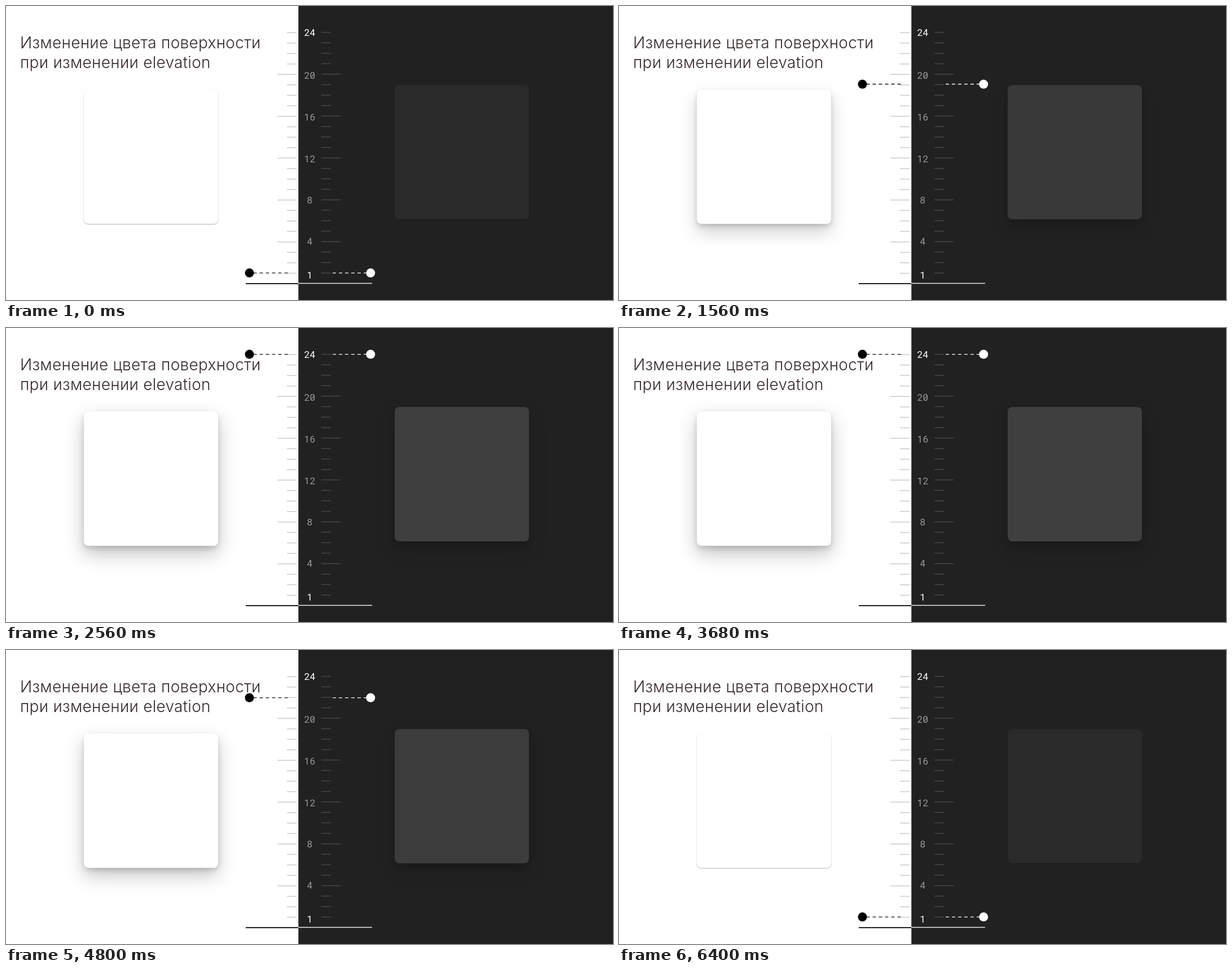
Animation of 1076 by 521 pixels, one loop 7.52 s. Source, as an HTML page:

```html
<!DOCTYPE html>
<html lang="ru">
<head>
<meta charset="utf-8">
<title>Elevation</title>
<style>
  html, body { margin: 0; width: 100%; height: 100%; overflow: hidden; background: #fff; }
  #stage { position: absolute; left: 0; top: 0; width: 1076px; height: 521px; overflow: hidden; }
  .card { position: absolute; width: 238px; height: 238px; border-radius: 8px; }
  #light { left: 138px; top: 148px; background: #fff; }
  #dark { left: 689px; top: 140px; }
  svg { position: absolute; left: 0; top: 0; }
  .title { font: 300 28px Inter, sans-serif; letter-spacing: .27px; fill: #352a2a; }
  .num { font: 17px Roboto, sans-serif; letter-spacing: .6px; text-anchor: middle; }
</style>
</head>
<body>
<div id="stage">
  <svg width="1076" height="521"><path d="M518.3 0H1076V521H518.3Z" fill="#212121"/></svg>
  <div class="card" id="light"></div>
  <div class="card" id="dark"></div>
  <svg width="1076" height="521" viewBox="0 0 1076 521">
    <g id="scale"></g>
    <path d="M541.6 126.2L545.7 119.8" stroke="#989898" stroke-width="1.2"/>
    <path d="M425 492H518" stroke="#231f20" stroke-width="1.8"/>
    <path d="M518 491.5H649" stroke="#e8e8e8" stroke-width="1.6"/>
    <g id="marker" stroke-width="1.4" stroke-dasharray="6 5">
      <path d="M499.5 0H438" stroke="#111"/>
      <path d="M579 0H640" stroke="#fff"/>
      <circle cx="431.5" r="8" fill="#000"/>
      <circle cx="646.3" r="8" fill="#fff"/>
    </g>
    <text class="title" x="25" y="74.5">Изменение цвета поверхности</text>
    <text class="title" x="25" y="109.5">при изменении elevation</text>
  </svg>
</div>
<script>
const LOOP = 7520, TOP = 46.6, BOTTOM = 473.1, TICK = (BOTTOM - TOP) / 23;
const $ = id => document.getElementById(id);
const mix = (a, b, k) => a + (b - a) * k;

function buildScale() {
  let ticks = '';
  for (let e = 1; e <= 24; e++) {
    const y = BOTTOM - (e - 1) * TICK;
    const len = e % 4 || e === 24 ? 17 : 34;
    ticks += `<path d="M${515 - len} ${y + .5}h${len}" stroke="#cbcbcb" stroke-width="1.5"/>` +
             `<path d="M559 ${y + .1}h${len}" stroke="#474747" stroke-width="1.5"/>`;
  }
  const labels = [[24, 53], [20, 129], [16, 203], [12, 277], [8, 350], [4, 423], [1, 483]];
  const nums = labels.map(([n, y]) =>
    `<text class="num" x="538.6" y="${y}" fill="${n === 24 || n === 1 ? '#fff' : '#989898'}">${n}</text>`);
  $('scale').innerHTML = ticks + nums.join('');
}

// Cubic ease in and out with handles at .42 and .58
function ease(x) {
  if (x <= 0) return 0;
  if (x >= 1) return 1;
  let lo = 0, hi = 1;
  for (let i = 0; i < 24; i++) {
    const u = (lo + hi) / 2, v = 1 - u;
    if (3 * v * v * u * .42 + 3 * v * u * u * .58 + u ** 3 < x) lo = u; else hi = u;
  }
  return lo * lo * (3 - 2 * lo);
}

// Lift, then y, blur, alpha of the wide shadow and of the tight one
const SHADOWS = [
  [0,    6, 4, 0,      1, 2, .3],
  [.267, 16, 20, .065, 2, 4, .18],
  [.4,   17, 24, .09,  3, 6, .18],
  [1,    14, 34, .24,  5, 10, .14]
];

function shadow(p, strength) {
  let i = 0;
  while (i < SHADOWS.length - 2 && p > SHADOWS[i + 1][0]) i++;
  const a = SHADOWS[i], b = SHADOWS[i + 1];
  const k = (p - a[0]) / (b[0] - a[0]);
  const s = a.map((v, j) => mix(v, b[j], k));
  const layer = j => `0 ${s[j]}px ${s[j + 1]}px rgba(0,0,0,${s[j + 2] * strength})`;
  return layer(1) + ',' + layer(4);
}

// Fifteen pictures per second, shown for 80, 80 and 40 ms in turn
function snap(t) {
  const step = Math.floor(t / 200) * 3 + Math.min(2, Math.floor(t % 200 / 80));
  return step * 200 / 3;
}

function draw(time) {
  const t = snap(time % LOOP);
  const p = ease((t - 190) / 1980) - ease((t - 4383) / 1998);
  $('marker').setAttribute('transform', `translate(0 ${mix(BOTTOM, TOP, p)})`);
  const g = p < .4 ? mix(42, 43.5, p / .4) : mix(43.5, 63, (p - .4) / .6);
  $('dark').style.background = `rgb(${g},${g},${g})`;
  $('light').style.boxShadow = shadow(p, 1);
  $('dark').style.boxShadow = shadow(p, .7);
}

buildScale();
draw(0);
const start = performance.now();
(function tick() {
  draw(performance.now() - start);
  requestAnimationFrame(tick);
})();
</script>
</body>
</html>
```
